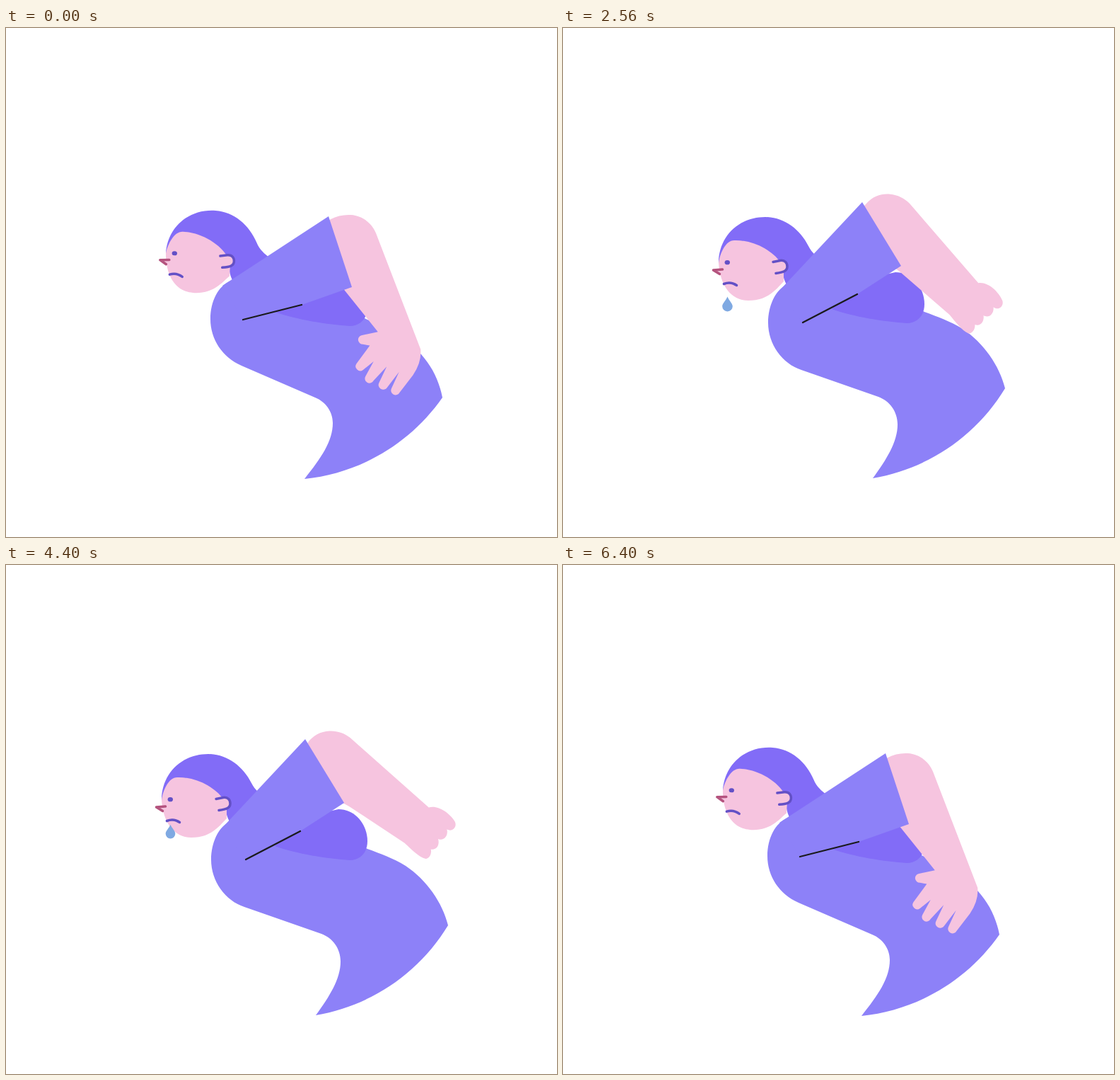
These frames come from a looping animation (779x719 px, 7.12 s). An HTML page:

```html
<!DOCTYPE html>
<html lang="en">
<head>
<meta charset="utf-8">
<title>Bent over</title>
<style>
  html, body { margin: 0; width: 100%; height: 100%; overflow: hidden; background: #fff; }
  svg { display: block; width: 100%; height: 100%; }
  .light { fill: #8d81f8; }
  .deep { fill: #826cf7; }
  .skin { fill: #f6c4df; }
  .tear { fill: #7fa9e2; }
  .ink { stroke: #6350c6; stroke-width: 3.5; stroke-linecap: round; stroke-linejoin: round; }
  .nose { stroke: #b4537e; }
  .seam { stroke: #1a1a1c; stroke-width: 2.3; stroke-linecap: round; }
</style>
</head>
<body>
<svg viewBox="0 0 779 719">
  <g id="head">
    <path class="deep" d="M220 332C220 295 248 267 286 267C312 267 335 284 347 308C352 318 359 323 368 329L335 375L318 365C312 358 310 345 310 338Z"/>
    <path class="skin" d="M220 332C222 318 230 300 242 300C267 299 296 313 309 333L312 346V358C306 364 303 368 298 372C288 381 276 385 262 385C238 385 222 364 220 332Z"/>
    <path class="skin ink" d="M297 330.5L307 328.5C314 327.5 317 332 317 337C317 343 312 345 301 346.5"/>
    <ellipse cx="232.3" cy="331.2" rx="3.7" ry="3.1" fill="#6350c6"/>
    <path class="skin ink nose" d="M225.5 341L212.5 342L221.5 347.5"/>
    <path class="ink" fill="none" d="M227.5 361.5C234 359 241 360.5 245.5 363.5"/>
  </g>
  <path id="body" class="light"/>
  <path id="inner" class="deep" d="M470 345C495 345 511 368 511 390C511 407 500 417 486 417C455 415 410 408 380 397L425 355Z"/>
  <path id="openArm" class="skin" d="M432 281L449 268C457 263 467 260 477 260C493 260 507 269 514 283L589 442Q592 460 581 479L564 505A6.5 6.5 0 0 1 552 500L561 476L546 499A6.5 6.5 0 0 1 534 493L543 470L526 491A6.5 6.5 0 0 1 514 486L524 464L510 477A6.5 6.5 0 0 1 500 469L517 442L507 441A6.5 6.5 0 0 1 504 428.5L527 422L475 366L440 330Z"/>
  <path id="curledArm" class="skin" d="M415 265L427 250C435 239 447 234 459 234C470 234 480 238 488 245L594 349C607 346 623 358 630 371C633 379 625 386 618 381C620 390 613 398 605 394C607 403 602 410 594 408C595 415 591 421 586 421C576 418 566 406 557 397L482 342L466 332Z"/>
  <path id="sleeve" class="light"/>
  <path id="seam" class="seam"/>
  <path id="tear" class="tear" d="M0 -11C2 -6 7.5 -1 7.5 3A7.5 7.5 0 0 1 -7.5 3C-7.5 -1 -2 -6 0 -11Z"/>
</svg>
<script>
const LOOP = 7120;
const STEP = 80;
const OPENING = [0, 100, 200, 280, 360];

// Each shape is given bent low, bent high and, where it matters, with the arm lifted.
const BODY = {
  low: 'M422 637C501 628.7 571.5 587 617 522C612 497 602 478 587 461C565 437 540 424 511 412L400 358L318 357C300 364 289 386 289 411C289 440 306 465 333 477L437 522C452 528 462 542 462 558C462 584 445 608 422 637Z',
  high: 'M438 636C516 622.6 583.8 576.8 625 509C617 477 595 445 565 425C547 414 530 408 511 401L400 350L316 363C300 370 290 393 290 416C290 447 310 474 337 483L446 521C462 527 473 542 473 560C473 585 457 610 438 636Z'
};
const SLEEVE = {
  low: 'M456 266L489 366L418 391L335 412L306 364Z',
  high: 'M446 264L486 361L418 391L336 419L304 373Z',
  lifted: 'M423 246L478 336L416 376L339 416L304 373Z'
};
const SEAM = {
  low: 'M335 412L418 391',
  high: 'M336 419L418 391',
  lifted: 'M339 416L416 376'
};
const ELBOW = { low: [485, 302], high: [477, 298], lifted: [459, 272.5] };
const ARMS = {
  openArm: { pivot: [477, 298], angle: 55.9 },
  curledArm: { pivot: [459, 272], angle: 40.3 }
};

const $ = id => document.getElementById(id);
const mix = (a, b, k) => a + (b - a) * k;
const smooth = u => { u = Math.min(1, Math.max(0, u)); return u * u * (3 - 2 * u); };
const ease = (t, from, to) => smooth((t - from) / (to - from));
const show = (el, on) => el.setAttribute('visibility', on ? 'visible' : 'hidden');

function mixPath(a, b, k) {
  const ends = b.match(/[\d.]+/g);
  let i = 0;
  return a.replace(/[\d.]+/g, n => mix(+n, +ends[i++], k).toFixed(2));
}

const snap = t => t < 560
  ? OPENING.filter(s => s <= t).pop()
  : Math.floor(t / STEP) * STEP;

function drawArm(t, lean, lift) {
  const raise = ease(t, 1320, 1800) - ease(t, 4600, 5560);
  const waving = t > 1800 && t < 4600;
  const wave = waving ? 4.2 * (1 - Math.cos((t - 1800) / 400 * 2 * Math.PI)) : 0;
  const angle = mix(60.1, 55.9, lean) - 10.1 * raise - wave;
  const sag = 2 * ease(t, 4600, 5560);
  const [x, y] = [0, 1].map(i =>
    mix(mix(ELBOW.low[i], ELBOW.high[i], lean), ELBOW.lifted[i], lift));
  const active = angle < 47.5 ? 'curledArm' : 'openArm';

  for (const [id, arm] of Object.entries(ARMS)) {
    const [px, py] = arm.pivot;
    show($(id), id === active);
    $(id).setAttribute('transform',
      `translate(${x - px} ${y - py + sag}) rotate(${angle - arm.angle} ${px} ${py})`);
  }
}

function drawTear(t) {
  const visible = t > 1660 && t < 4900;
  show($('tear'), visible);
  if (!visible) return;
  const age = (t - 1660) % 1080;
  const fall = Math.max(0, age - 870);
  const y = 342 + 47 * ease(age, 0, 870) + 0.0013 * fall * fall;
  const size = 1 - Math.exp(-age / 240);
  $('tear').setAttribute('transform', `translate(232.5 ${y}) scale(${size})`);
}

function draw(t) {
  const lean = t < 5600
    ? smooth(t < 560 ? t / 720 : 0.5 + (t - 480) / 960)
    : 1 - ease(t, 5690, 6400);
  const lift = ease(t, 1320, 1900) - ease(t, 4680, 5560);
  const low = 1 - lean;
  const pose = shape => mixPath(mixPath(shape.low, shape.high, lean), shape.lifted, lift);

  $('head').setAttribute('transform',
    `translate(${5.3 * low} ${-10.7 * low}) rotate(${4 * low} 265 340)`);
  $('body').setAttribute('d', mixPath(BODY.low, BODY.high, lean));
  $('inner').setAttribute('transform', `translate(0 ${4 * low})`);
  $('sleeve').setAttribute('d', pose(SLEEVE));
  $('seam').setAttribute('d', pose(SEAM));
  drawArm(t, lean, lift);
  drawTear(t);
}

const start = performance.now();
function tick() {
  draw(snap((performance.now() - start) % LOOP));
  requestAnimationFrame(tick);
}
tick();
</script>
</body>
</html>
```
